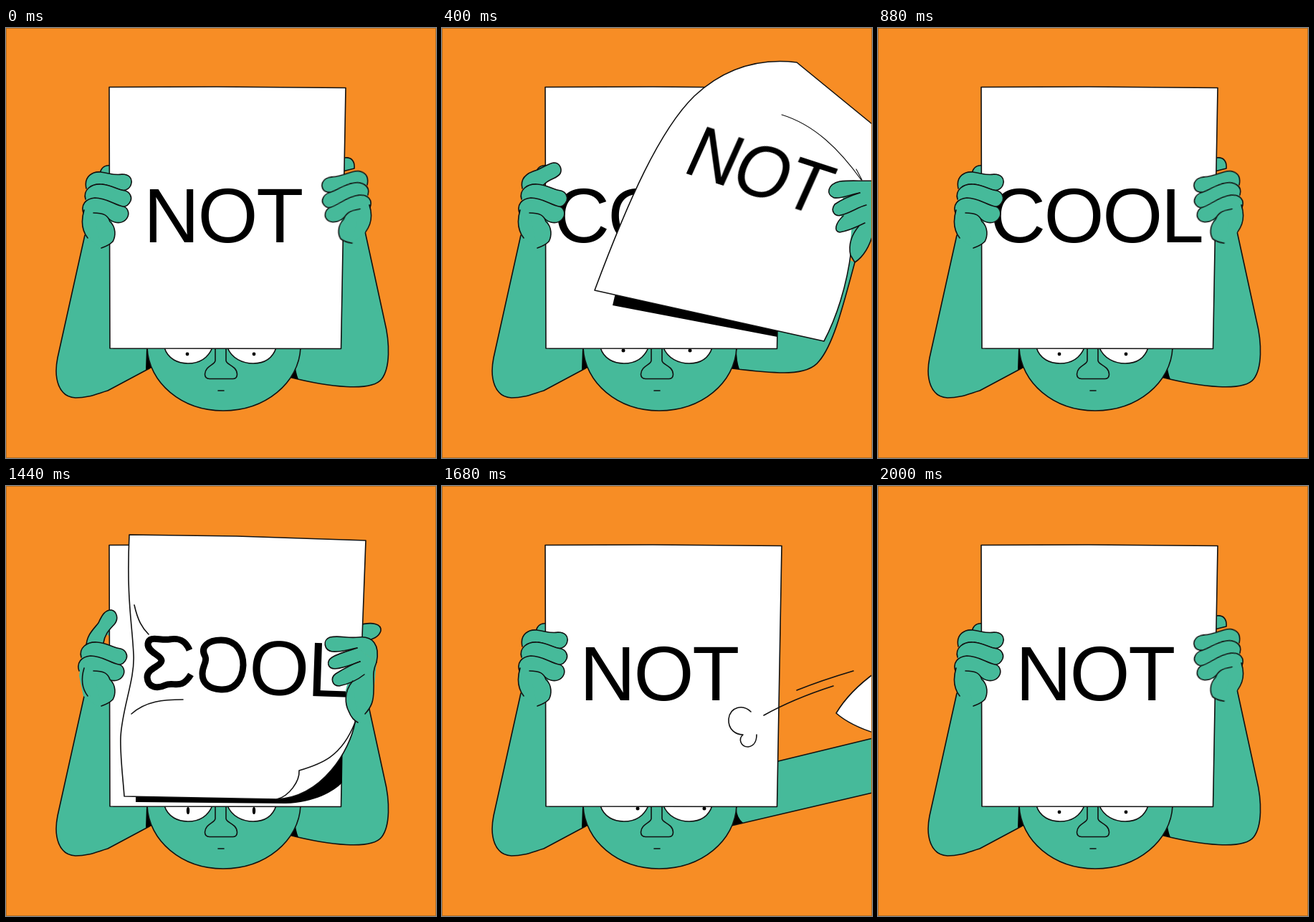
Animation of 600x600 px, one loop 2.08 s. Source, as an HTML page without scripts:

```html
<!DOCTYPE html>
<html lang="en">
<head>
<meta charset="utf-8">
<title>Not cool</title>
<style>
  html, body { margin: 0; width: 100%; height: 100%; overflow: hidden; background: #f78d25; }
  svg { display: block; width: 100%; height: 100%; }
  path { stroke: #111; stroke-width: 1.6; stroke-linecap: round; stroke-linejoin: round; }
  .skin { fill: #46ba9a; }
  .page { fill: #fff; }
  .line { fill: none; }
  .thin { stroke-width: 1.1; }
  .ink { fill: #000; stroke: none; }
  .bare { stroke: none; }
  .bend { fill: none; stroke: #000; stroke-width: 9; stroke-linecap: butt; stroke-linejoin: miter; }
  text { font: 108px "Liberation Sans", Arial, sans-serif; letter-spacing: -2.4px; fill: #000; }

  /* Each flip is seven 80 ms poses; the second flip begins 1120 ms after the first. */
  .pose, .still, .calm, .one, .two {
    animation: pose 2080ms step-end calc(var(--k, 0) * 80ms - 1760ms) infinite;
  }
  .still { animation-name: still; }
  .calm { animation-name: calm; }
  .one { animation-name: one; }
  .two { animation-name: two; }
  @keyframes pose {
    0%, 53.846% { opacity: 1; }
    3.846%, 57.692%, 100% { opacity: 0; }
  }
  @keyframes still {
    0%, 53.846% { opacity: 0; }
    23.076%, 76.923%, 100% { opacity: 1; }
  }
  @keyframes calm {
    0%, 53.846% { opacity: 0; }
    26.923%, 80.769%, 100% { opacity: 1; }
  }
  @keyframes one { 0% { opacity: 1; } 53.846%, 100% { opacity: 0; } }
  @keyframes two { 0% { opacity: 0; } 53.846%, 100% { opacity: 1; } }
</style>
</head>
<body>
<svg viewBox="0 0 600 600">
  <defs>
    <g id="fingers" class="skin">
      <path class="bare" d="M112 235L108 265L114 293L133 307L150 290L145 240Z"/>
      <path d="M111 239C107 226 119 217 133 218C148 219 155 226 166 227C173 229 176 236 174 241C171 248 166 251 158 249C148 246 142 240 128 239"/>
      <path d="M108 258C104 247 111 238 124 237C140 237 150 246 163 249C170 250 172 258 170 263C167 270 160 273 152 271C146 270 143 265 138 262"/>
    </g>
    <g id="palm" class="skin">
      <path d="M114 293C104 280 106 264 109 254"/>
      <path d="M122 258C136 258 142 261 145 270C154 278 153 291 149 298C144 303 139 305 133 307"/>
    </g>
    <g id="left">
      <path class="skin" d="M112 224C108 206 122 200 132 201C146 203 152 206 162 204C172 204 176 210 175 216C174 223 168 228 160 226C150 224 144 219 134 218"/>
      <use href="#fingers"/>
      <use href="#palm"/>
    </g>
    <path id="arm-up" class="skin" d="M501 284L528 408C536 440 536 475 524 490C510 508 450 501 395 487L411 447H460V290"/>
    <path id="arm-up-gap" class="ink" d="M403 466Q404 480 408 490L393 487Z"/>
    <g id="arm-bent">
      <path class="skin" d="M576 327C559 390 546 442 526 465C510 486 470 483 405 475L411 447L460 420L560 320"/>
      <path class="ink" d="M411 448L402 475L415 476Q411 465 411 448Z"/>
    </g>
    <g id="arm-out">
      <path class="skin" d="M605 351L469 384L411 447L404 474L605 427"/>
      <path class="ink" d="M411 450L403 474L420 470Q411 462 411 450Z"/>
    </g>
    <g id="hand-out" class="skin">
      <path class="bare" d="M555 214H605V285L576 327L569 312L572 272L556 262L560 232Z"/>
      <path d="M605 213C585 214 570 212 555 214C538 218 535 232 547 237C560 238 570 232 583 230"/>
      <path d="M583 230C570 234 558 239 548 246C541 256 549 264 557 261C570 258 580 250 592 247"/>
      <path d="M560 262C549 272 546 284 555 285C568 283 582 276 590 272"/>
      <path d="M582 276C570 290 567 303 570 317L576 327C590 318 598 300 602 285"/>
    </g>
    <g id="pupils-right">
      <circle cx="273" cy="450" r="2.5"/><circle cx="366" cy="450" r="2.5"/>
    </g>
    <path id="puff" class="line" d="M431 315C420 304 402 308 400 325C399 340 410 347 420 347C413 353 417 364 427 364C436 363 439 355 439 347"/>
  </defs>

  <rect width="600" height="600" fill="#f78d25"/>

  <!-- arms -->
  <path class="skin" d="M110 289L72 460C66 490 74 515 97 516C115 516 125 511 142 506L200 475L197 447H150V290"/>
  <path class="ink" d="M196 447L204 474L195 477Z"/>
  <path class="skin" d="M131 203C133 193 140 191 146 192V210"/>
  <g class="still">
    <path class="skin" d="M473 181C482 180 487 186 486 196L470 200"/>
    <use href="#arm-up"/><use href="#arm-up-gap"/>
  </g>
  <g class="pose"><use href="#arm-up"/><use href="#arm-up-gap"/></g>
  <g class="pose" style="--k:1"><use href="#arm-bent"/></g>
  <g class="pose" style="--k:2"><use href="#arm-out"/></g>
  <g class="pose" style="--k:3"><use href="#arm-out"/></g>
  <g class="pose" style="--k:4"><use href="#arm-out"/></g>
  <g class="pose" style="--k:5"><use href="#arm-bent"/></g>

  <!-- head -->
  <path class="skin" d="M197 446C199 495 245 534 303 534C362 534 409 495 411 446"/>
  <path class="page" d="M221 446C226 462 240 468 254 468C270 468 282 460 288 446"/>
  <path class="page" d="M309 446C315 461 330 468 345 468C362 468 372 461 377 446"/>
  <path class="skin" d="M292 446V464C292 470 278 471 277.500 483Q277.500 489.500 284 489.500H317Q322.500 489.500 322.500 483C322 471 307 470 307 464V446"/>
  <path class="line" d="M296 506H304"/>
  <g class="calm"><circle cx="253" cy="455" r="2.4"/><circle cx="346" cy="455" r="2.4"/></g>
  <g class="pose">
    <ellipse cx="254" cy="453" rx="2.2" ry="5"/><ellipse cx="346" cy="453" rx="2.2" ry="5"/>
  </g>
  <g class="pose" style="--k:1"><circle cx="253" cy="450" r="2.5"/><circle cx="346" cy="450" r="2.5"/></g>
  <g class="pose" style="--k:2"><use href="#pupils-right"/></g>
  <g class="pose" style="--k:3"><use href="#pupils-right"/></g>
  <g class="pose" style="--k:4"><use href="#pupils-right"/></g>
  <g class="pose" style="--k:5"><use href="#pupils-right"/></g>
  <g class="pose" style="--k:6"><use href="#pupils-right"/></g>

  <!-- sign -->
  <path class="page" d="M144 82.500L294 82L474 83.500L467.500 447.500L145 447Z"/>
  <text class="one" x="156" y="299">COOL</text>
  <text class="two" x="192" y="299">NOT</text>

  <!-- hands and flying sheet -->
  <g class="still">
    <use href="#left"/>
    <use href="#left" transform="matrix(-1 .15 0 .94 616 -8.25)"/>
  </g>

  <g class="pose">
    <path class="ink" d="M181 430V441L390 443C430 442 458 426 469 414V375L380 430Z"/>
    <path class="skin" d="M490 195C512 188 524 193 523 202C520 212 510 214 500 217"/>
    <path class="page" d="M172 68L322 70L502 76L497 210L487 330C480 368 442 434 378 437L165 433C163 405 159 375 160 350C162 310 180 270 178 235C176 190 168 160 172 68Z"/>
    <path class="line" d="M487 330C468 378 440 388 409 397C410 412 395 433 378 437"/>
    <path class="line" d="M179 166C184 188 190 198 199 207M175 318C195 300 220 298 247 298"/>
    <g class="one">
      <path class="bend" d="M233 286C229 265 246 250 240 236C234 225 230 220 234 212L283 287V213"/>
      <text transform="translate(295 288) rotate(2)">OT</text>
    </g>
    <g class="two">
      <path class="bend" d="M256 229C250 214 240 212 228 214C214 216 200 208 198 220C197 232 217 236 217 244C216 252 197 254 197 267C198 282 212 283 222 278C234 272 244 286 258 263"/>
      <path class="bend" d="M300 215C322 215 331 232 331 250C330 272 318 285 300 284C283 283 274 275 274 262C274 250 281 246 278 238C270 224 283 215 300 215Z"/>
      <text transform="translate(338 290) rotate(2)">OL</text>
    </g>
    <g class="skin">
      <path class="bare" d="M517 246L513 290L501 318L491 330L476 308L474 285L490 225Z"/>
      <path d="M517 246C522 222 512 209 492 211C476 213 466 208 452 211C441 215 444 229 455 231C468 232 478 228 490 226"/>
      <path d="M490 226C478 230 465 233 455 239C446 245 449 255 459 255C472 254 482 249 494 245"/>
      <path d="M494 245C482 249 468 257 460 262C452 268 455 279 465 279C480 276 490 271 500 263"/>
      <path d="M517 246C510 262 514 268 513 285C513 300 510 308 501 318"/>
      <path d="M484 272C470 288 474 306 478 314C482 324 486 327 491 330"/>
      <path d="M112 224C112 208 123 199 129 191C134 180 138 173 147 173C155 175 157 185 152 192C144 201 138 206 136 219"/>
    </g>
    <use href="#fingers" x="-6"/>
    <use href="#palm"/>
  </g>

  <g class="pose" style="--k:1">
    <path class="ink" d="M242 370L238 387L468 431V415Z"/>
    <path class="page" d="M213 366C260 240 304 142 352 95C395 55 445 42 495 48L605 138V230L571 310C565 360 550 405 533 437Z"/>
    <path class="line thin" d="M474 121C520 135 555 170 585 212M578 197L586 212"/>
    <text class="one" transform="matrix(.86 .28 -.39 .87 333 201)">NOT</text>
    <text class="two" transform="matrix(.86 .28 -.39 .87 302 191)">COOL</text>
    <use href="#hand-out"/>
    <path class="skin" d="M112 224C108 208 122 201 133 198C142 194 149 189 156 188C164 188 168 196 165 203C160 211 148 210 141 220"/>
    <use href="#fingers"/>
    <use href="#palm"/>
  </g>

  <g class="pose" style="--k:2">
    <path class="page" d="M605 110C520 150 440 230 385 330C450 370 530 400 605 410"/>
    <text class="one" transform="matrix(.8 .3 -.45 .8 480 270)">NOT</text>
    <text class="two" transform="matrix(.8 .3 -.45 .8 455 260)">COOL</text>
    <use href="#left"/>
  </g>

  <g class="pose" style="--k:3">
    <path class="page" d="M605 260C580 278 562 297 550 317C565 330 582 338 605 345"/>
    <path class="line" d="M449 320Q490 297 546 279M495 285Q530 271 574 258"/>
    <use href="#puff"/>
    <use href="#left"/>
  </g>

  <g class="pose" style="--k:4">
    <use href="#puff" transform="translate(168 134) scale(.6)"/>
    <use href="#left"/>
  </g>

  <g class="pose" style="--k:5">
    <use href="#hand-out"/>
    <use href="#left"/>
  </g>

  <rect x=".5" y=".5" width="599" height="599" fill="none" stroke="#b9701f"/>
</svg>
</body>
</html>
```
